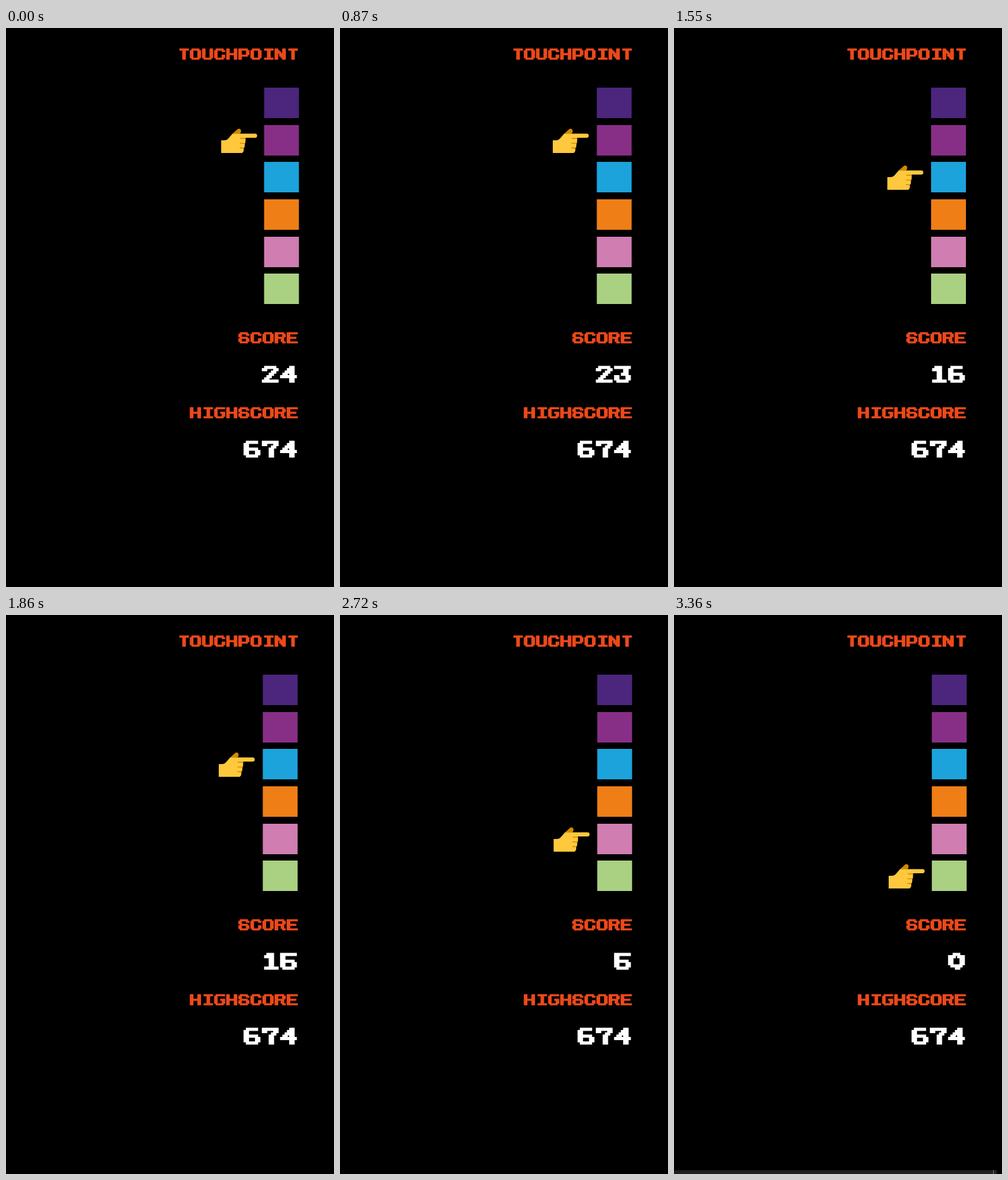
Recreate the animation shown at these times as an HTML page with a canvas. Size 518x881 px, loop 3410 ms.

```html
<!DOCTYPE html>
<html lang="en">
<head>
<meta charset="utf-8">
<title>Touchpoint</title>
<style>
html, body { margin: 0; width: 100%; height: 100%; overflow: hidden; background: #000; }
canvas { display: block; }
</style>
</head>
<body>
<canvas id="stage" width="518" height="881"></canvas>
<script>
const ctx = document.getElementById('stage').getContext('2d');
const LOOP = 3410, ORANGE = '#ee4a1b';
const swatches = ['#4b267c', '#872f86', '#1ca3dc', '#ef7e16', '#d07db1', '#aad081'];

// Arcade lettering: strokes join key points a..t of a 4 x 5 lattice, row by row.
// Right-angled turns inside a stroke are rounded; the pen is two cells wide.
const strokes = {
  C: 'hdaqtp', E: 'da,aq,qt,ik', G: 'daqtl,kl', H: 'aq,dt,il', I: 'ad,br,qt',
  N: 'aq,dt,at', O: 'iadtqi', P: 'aq,adpm', R: 'aq,adli,jt', S: 'hdailtqm',
  T: 'ad,br', U: 'aqtd',
  0: 'bhprmeb', 1: 'eb,br,qt', 2: 'eadhq,qt', 3: 'ad,dj,jltqm', 4: 'cs,cm,mp',
  5: 'da,ai,iltqm', 6: 'caqtli', 7: 'ea,ad,dhjr', 8: 'iadtqi,il', 9: 'liadtr'
};
const COLS = [0, 3, 4, 5], ROWS = [0, 1, 3, 4, 6];

function keyPoint(letter) {
  const i = letter.charCodeAt(0) - 97;
  return [COLS[i % 4], ROWS[i >> 2]];
}

function roundTurns(points) {
  return points.flatMap((p, i) => {
    if (i === 0 || i === points.length - 1) return [p];
    const into = p.map((v, k) => v - points[i - 1][k]);
    const out = p.map((v, k) => points[i + 1][k] - v);
    if (into[0] * out[0] + into[1] * out[1] !== 0) return [p];
    return [p.map((v, k) => v - Math.sign(into[k])), p.map((v, k) => v + Math.sign(out[k]))];
  });
}

function glyphCells(code) {
  const cells = new Map();
  const narrow = code.includes('br'); // a centred stem makes a six-cell glyph
  const add = (x, y) => { if (x || !narrow) cells.set(x + ',' + y, [x, y]); };
  for (const stroke of code.split(',')) {
    const points = roundTurns([...stroke].map(keyPoint));
    for (let i = 1; i < points.length; i++) {
      const [x0, y0] = points[i - 1], [x1, y1] = points[i];
      const n = Math.max(Math.abs(x1 - x0), Math.abs(y1 - y0), 1);
      for (let k = 0; k <= n; k++) {
        const x = Math.round(x0 + (x1 - x0) * k / n);
        const y = Math.round(y0 + (y1 - y0) * k / n);
        add(x, y);
        add(x + 1, y);
      }
    }
  }
  return [...cells.values()];
}
const font = {};
for (const ch in strokes) font[ch] = glyphCells(strokes[ch]);

function drawText(text, right, top, cell, color) {
  const left = right - (text.length * 8 - 1) * cell;
  ctx.beginPath();
  [...text].forEach((ch, i) => {
    for (const [x, y] of font[ch]) ctx.rect(left + (i * 8 + x) * cell, top + y * cell, cell, cell);
  });
  ctx.fillStyle = ctx.strokeStyle = color;
  ctx.lineWidth = cell * .38; // bold weight
  ctx.fill();
  ctx.stroke();
}
const label = (text, top) => drawText(text, 460.5, top, 2.39, ORANGE);
const number = (value, top) => drawText(String(value), 458.7, top, 3.6, '#fff');

const palm = new Path2D('M0 24H5Q9 24 11.5 21L18 13.5H53.5a3.25 3.25 0 0 1 0 6.5H38.5V25' +
  'q0 3-1.2 4v3q0 3.5-1.8 4.5q1 5.5-2.5 7.5H0Z');
const thumb = new Path2D('M16 15.5L25.3 6.9C28 4.5 32 6.5 31.4 10Q31 12 29.5 13.7H18Z');
const creases = new Path2D('M30 21H38.5M29.5 28.6H38M29.5 36H36');

function drawHand(x, y) {
  ctx.save();
  ctx.translate(x, y);
  ctx.fillStyle = ctx.strokeStyle = '#d08a00';
  ctx.fill(thumb);
  ctx.fillStyle = '#ffc83d';
  ctx.fill(palm);
  ctx.lineWidth = 1.4;
  ctx.stroke(creases);
  ctx.restore();
}

const rowTop = row => Math.floor(94.5 + 58.67 * row);

// One step back up, then a row down on each beat; the score runs a point per tick.
const BEAT = 560, TICK = 60, BACK = 260;

function pose(t) {
  let row = Math.floor((t - 200) / BEAT), start = 200 + row * BEAT, step = 1;
  if (t < BACK) {
    row = 1;
    start = 0;
  } else if (row < 1) {
    row = 0;
    start = BACK;
    step = -1;
  }
  const left = Math.max(0, 4 - Math.floor((t - start) / TICK));
  return { row, score: 25 - 5 * row + step * left };
}

// Sway: key times and the turns completed by then.
const sway = [[0, 0], [1230, 1.9], [1860, 2.65], [2390, 3.5], [2720, 4.25], [LOOP, 5.2]];

function swing(t) {
  const i = sway.findIndex(k => k[0] > t);
  const [t0, p0] = sway[i - 1], [t1, p1] = sway[i];
  return Math.cos(2 * Math.PI * (p0 + (p1 - p0) * (t - t0) / (t1 - t0)));
}

function draw(t) {
  const { row, score } = pose(t), s = swing(t);
  ctx.fillStyle = '#000';
  ctx.fillRect(0, 0, 518, 881);
  swatches.forEach((color, i) => {
    ctx.fillStyle = color;
    ctx.fillRect(406.3 + 1.3 * s, rowTop(i), 55, 48);
  });
  drawHand(337.4 + 2.4 * s, rowTop(row));
  label('TOUCHPOINT', 32.8);
  label('SCORE', 479.9);
  number(score, 533.2);
  label('HIGHSCORE', 598);
  number(674, 651.2);
  if (t >= 3355) {
    ctx.fillStyle = '#1f1f1f';
    ctx.fillRect(0, 875, 510, 6);
    ctx.fillStyle = '#777';
    ctx.fillRect(504, 875, 1, 6);
  }
}

const begin = performance.now();
function frame() {
  draw((performance.now() - begin) % LOOP);
  requestAnimationFrame(frame);
}
frame();
</script>
</body>
</html>
```
